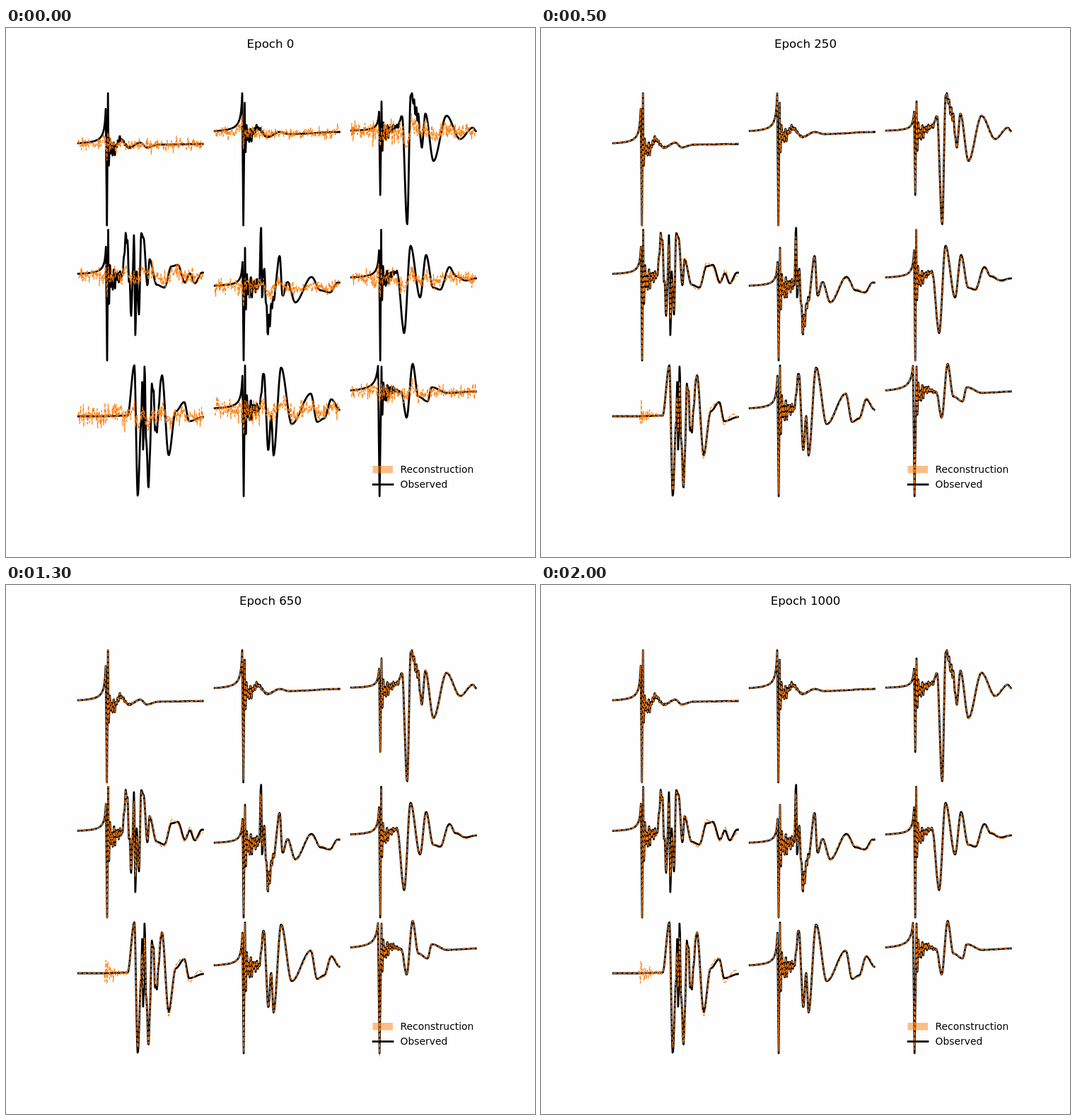
An HTML page with a canvas for the animation above (2.5 s loop, 748x748 px).

```html
<!DOCTYPE html>
<html lang="en">
<head>
<meta charset="utf-8">
<title>Reconstruction by epoch</title>
<style>
html, body { margin: 0; width: 100%; height: 100%; overflow: hidden; background: #fefefe; }
canvas, svg { position: absolute; left: 0; top: 0; width: 748px; height: 748px; }
text { font-family: "DejaVu Sans", sans-serif; font-size: 13.89px; fill: #000; }
#title { font-size: 16.67px; text-anchor: middle; }
</style>
</head>
<body>
<canvas id="plot" width="748" height="748"></canvas>
<svg viewBox="0 0 748 748">
  <text id="title" x="374" y="28">Epoch 0</text>
  <text x="557.5" y="629">Reconstruction</text>
  <text x="557.5" y="650">Observed</text>
</svg>
<script>
const ctx = document.getElementById('plot').getContext('2d');
const title = document.getElementById('title');
const STEP = 100, LAST = 20, LOOP = 2500;
const ORANGE = '#ff7f0e', WIDE = 2.78, THIN = 1.25;
const LEFT = 102.2, PITCH = 193, SPAN = 176.5, DX = 0.65;
const TAU = 2 * Math.PI;
const bell = d => Math.exp(-d * d);

// Repeatable uniform value in 0..1
function rand(a, b, c) {
  let h = Math.imul(a + 11, 374761393) ^ Math.imul(b + 7, 668265263) ^ Math.imul(c + 3, 1274126177);
  h = Math.imul(h ^ (h >>> 15), 2246822519);
  h = Math.imul(h ^ (h >>> 13), 3266489917);
  return ((h ^ (h >>> 16)) >>> 0) / 4294967296;
}
function gauss(a, b, c) {
  const r = Math.sqrt(-2 * Math.log(rand(a, b, c) + 1e-9));
  return r * Math.cos(TAU * rand(a, b, c + 5000));
}

// Eases from one turning point (x,y pairs) to the next
function curve(keys) {
  return x => {
    let i = 0;
    while (i < keys.length - 4 && keys[i + 2] < x) i += 2;
    const [x0, y0, x1, y1] = keys.slice(i, i + 4);
    const t = Math.min(1, Math.max(0, (x - x0) / (x1 - x0)));
    return y0 + (y1 - y0) * t * t * (3 - 2 * t);
  };
}

// rise: x, height and width of the ramp; spike: x,y pairs; ring: size and decay
// burst: x, width and size of extra ripple; keys: turning points of the slow wave
// noise: spread at the start; blur: lost detail; miss: lasting misfit; chatter: false onset
const shapes = [
  { base: 165.5, rise: [141, 51, 2], spike: [142.7, 279, 144.2, 92.5], ring: [21, 10], noise: 3.6,
    keys: [145, 172, 154, 171, 161, 157, 174, 169, 190, 162, 199, 169, 215, 165, 279, 164] },
  { base: 148.5, rise: [334, 56, 2], spike: [335.6, 279, 337.5, 106], ring: [21, 10], noise: 3.8,
    keys: [339, 153, 346, 152, 355, 141, 370, 154, 387, 147, 400, 150, 472, 147] },
  { base: 146.5, rise: [527.5, 28, 2], spike: [529.2, 236, 531, 104], ring: [22, 10], burst: [580, 6, 9],
    noise: 6, blur: 0.4, miss: 1,
    keys: [532, 150, 554, 139, 560, 124, 567.3, 278, 572.3, 93, 582, 123, 588, 168, 593, 121, 604.5, 188,
      623, 124, 642, 157, 660, 141, 665, 146] },
  { base: 349.5, rise: [141.3, 40, 2], spike: [143, 470, 144.5, 285.5], ring: [30, 11], burst: [175, 7, 12],
    noise: 5, blur: 0.8, miss: 5,
    keys: [146, 358, 164, 350, 170, 294, 177.5, 398, 181, 297, 183, 433, 184.7, 345, 188, 405, 191.2, 290,
      194.5, 297, 200, 364, 203, 327, 213, 363, 224, 367, 234, 337, 243, 335, 253, 360, 260, 347, 267, 361, 277, 346] },
  { base: 366, rise: [334.5, 35, 2], spike: [336, 470, 338, 311], ring: [27, 14], burst: [372, 6, 12],
    noise: 4.5, blur: 0.8, miss: 2,
    keys: [339, 369, 358, 363, 360.8, 283, 362.3, 385, 364.5, 340, 370.3, 422, 378, 385, 387, 322, 391, 379,
      398, 359, 409, 388, 432, 352, 445, 371, 458, 374, 469, 360] },
  { base: 354.5, rise: [527.5, 40, 2], spike: [529.2, 470, 530.5, 285.5], ring: [27, 8], noise: 5, blur: 1, miss: 2,
    keys: [532, 356, 553, 345, 563, 431, 572, 308, 585.5, 381, 594, 321, 604, 367, 614, 370, 627, 338,
      636, 351, 650, 357, 665, 354] },
  { base: 549, rise: [138, 0, 2], burst: [208, 8, 10], noise: 7.2, blur: 0.8, miss: 6, chatter: 13,
    keys: [138, 549, 172, 548, 181.5, 477, 186.3, 662, 191, 560, 192.7, 500, 194, 598, 196, 477, 198, 580,
      201.5, 647, 207, 502, 212, 572, 220.5, 491, 230, 604, 240, 542, 252, 529, 259, 556, 279, 550] },
  { base: 540, rise: [334.3, 48, 2], spike: [336.1, 662, 338, 477.5], ring: [30, 11], noise: 6.5, blur: 0.5, miss: 2,
    keys: [339, 542, 358, 538, 364.5, 488, 371, 597, 375, 548, 378.3, 604, 389, 480, 404, 560, 431, 517,
      440, 557, 450, 552, 460, 525, 472, 540] },
  { base: 516, rise: [526, 38, 4], spike: [528.2, 662, 531, 479], ring: [25, 9], noise: 5,
    keys: [532, 520, 546, 511, 559, 515, 566.5, 551, 575, 475, 583, 521, 596, 528, 602, 508, 624, 516, 665, 514] }
];

function build(shape, n) {
  const { base, rise, spike = [], ring = [0, 1], burst = [0, 1, 0], blur = 0.15 } = shape;
  const slow = curve(shape.keys), pts = [];
  const left = LEFT + PITCH * (n % 3), [top, height, width] = rise;
  const soft = (x, w) => (slow(x - w) + 2 * slow(x) + slow(x + w)) / 4;
  const ramp = x => base - height * width / (width + top - x);
  const put = (x, y, fit, rough, sharp) => pts.push({ x, y, fit, rough: base + (rough - base) * 0.2, sharp });

  for (let x = left; x < top; x += DX) put(x, ramp(x), ramp(x), ramp(x), false);
  const peaks = [top, ramp(top), ...spike];
  for (let i = 0; i < peaks.length; i += 2) put(peaks[i], peaks[i + 1], peaks[i + 1], peaks[i + 1], true);

  const from = peaks[peaks.length - 2];
  for (let x = from + DX; x <= left + SPAN; x += DX) {
    const t = x - from - 1.2;
    const beat = 0.7 * Math.cos(TAU * t / 2.8) + 0.4 * Math.cos(TAU * t / 4.5);
    const ripple = ring[0] * Math.exp(-t / ring[1]) * beat
      + burst[2] * bell((x - burst[0]) / burst[1]) * Math.cos(TAU * t / 3.1);
    put(x, slow(x) + ripple, soft(x, blur) + ripple * 0.95, soft(x, 3) + ripple, false);
  }
  return { pts, base, n, start: top, noise: shape.noise, miss: shape.miss || 0.5, chatter: shape.chatter || 0 };
}
const traces = shapes.map(build);

function fitted({ pts, base, n, start, noise, miss, chatter }, k) {
  const rest = Math.exp(-1.9 * k);
  const gain = 0.96 + 0.07 * rand(n, k, 1);
  const phase = n + 0.8 * rand(n, k, 2);
  return pts.map((p, i) => {
    const since = p.x - start;
    let y = p.sharp ? base + (p.fit - base) * gain : p.fit;
    if (since > 0) {
      y += miss * Math.sin(since / 4.5 + phase) * Math.min(1, since / 90) ** 2;
      const onset = Math.exp(-since / 13) * Math.min(1, since / 3);
      y += chatter * onset * (Math.sin(2.1 * p.x + k * 1.7) + 0.6 * gauss(n, k, i + 900));
    }
    y += (p.rough - y) * rest;
    const swell = 1 + 0.5 * bell((since - 5) / 22);
    return y + gauss(n, k, i + 100) * (noise * swell * rest + 0.2);
  });
}

function pen(color, width, cap, dash) {
  ctx.strokeStyle = color;
  ctx.lineWidth = width;
  ctx.lineCap = cap;
  ctx.lineJoin = 'round';
  ctx.setLineDash(dash);
}
function line(pts, yOf) {
  ctx.beginPath();
  pts.forEach((p, i) => ctx.lineTo(p.x, yOf(p, i)));
  ctx.stroke();
}

function draw(k) {
  ctx.fillStyle = '#fefefe';
  ctx.fillRect(0, 0, 748, 748);
  for (const t of traces) {
    pen('#000', WIDE, 'square', []);
    line(t.pts, p => p.y);
    const fit = fitted(t, k);
    pen(ORANGE, THIN, 'butt', [5.14, 2.22]);
    line(t.pts, (p, i) => fit[i]);
  }
  ctx.globalAlpha = 0.5;
  ctx.fillStyle = ORANGE;
  ctx.fillRect(518.5, 619, 28.5, 10.5);
  ctx.globalAlpha = 1;
  pen('#000', WIDE, 'square', []);
  line([{ x: 519.2 }, { x: 547 }], () => 645.5);
  title.textContent = 'Epoch ' + k * 50;
}

let shown = -1;
const begin = performance.now();
function tick(now) {
  const k = Math.min(LAST, Math.floor((Math.max(0, now - begin) % LOOP) / STEP));
  if (k !== shown) draw(shown = k);
  requestAnimationFrame(tick);
}
tick(begin);
</script>
</body>
</html>
```
